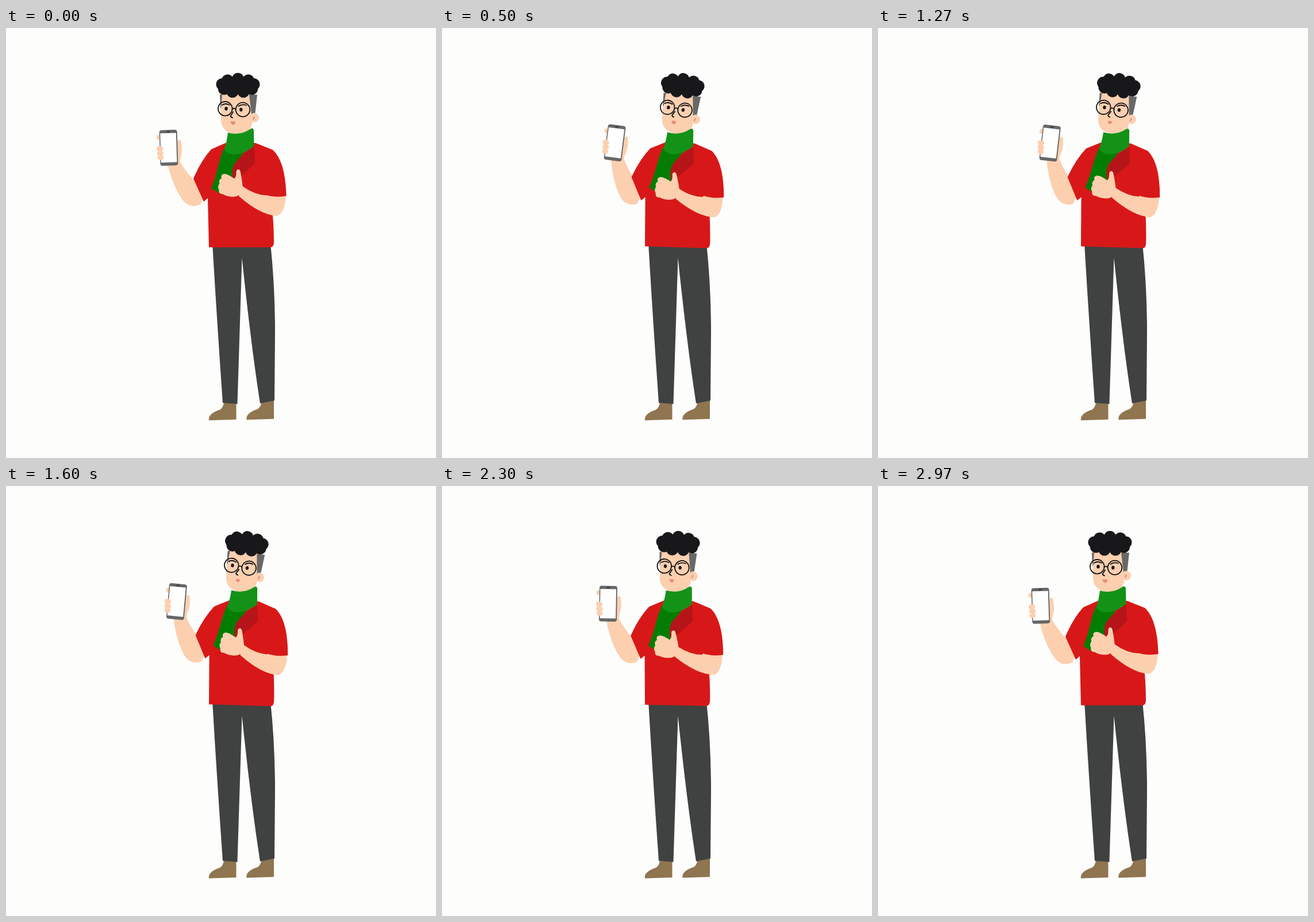
These frames come from a looping animation (748 by 748 pixels, 3 s). An HTML page:

```html
<!DOCTYPE html>
<html lang="en">
<head>
<meta charset="utf-8">
<title>Man with phone</title>
<style>
  html, body { margin: 0; width: 100%; height: 100%; overflow: hidden; background: #fdfdfc; }
  svg { display: block; width: 100vw; height: 100vh; }
  .skin { fill: #fccfaf; }
  .red { fill: #d81818; }
  .dark { fill: #18181b; }
  .side { fill: #676868; }
  .line { fill: none; stroke: #121214; stroke-width: 1.8; stroke-linecap: round; }
  .fingers { stroke: #fccfaf; stroke-width: 8.5; stroke-linecap: round; }
</style>
</head>
<body>
<svg viewBox="0 0 748 748">
  <g fill="#8f7550">
    <path id="shoe" d="M379 648H400.500V681L353 682.500Q351 671 372 664Q379 660 379 648Z"/>
    <use href="#shoe" x="65.500" y="-1"/>
  </g>
  <path fill="#404241" d="M359 374H460Q468 450 468 530L467 648L442 653Q426 550 410.500 400L402.500 654L377 652Q367 510 359 374Z"/>

  <g id="torso">
    <g id="arm" class="skin">
      <path d="M281 236Q290 276 308 300Q320 315 338 307L350 276L326 264Q308 244 301 229Z"/>
      <path d="M290 205L298 198C299 193 304 193 304.500 198Q308 214 304 224L302 240H281L272 226Z"/>
      <path class="fingers" d="M266 190h5"/>
      <g transform="translate(283 208.300) rotate(-1.800)">
        <rect x="-15.500" y="-31" width="31" height="62" rx="4" fill="#666768"/>
        <rect x="-14" y="-25.500" width="27.600" height="51" fill="#fff"/>
        <rect x="-3" y="-29" width="6" height="1.800" rx=".9" fill="#2c2c30"/>
      </g>
      <path class="fingers" d="M266 210h3M267 218h3M268 225.500h2"/>
    </g>

    <g id="head">
      <path class="skin" d="M373 112H428V168Q422 185 402 185Q374 183 374 158Z"/>
      <circle class="skin" cx="432" cy="156" r="8"/>
      <path d="M429 157Q430 152 433 154Q433 160 429 160Z" fill="#dfa591"/>
      <path class="side" d="M372 116H376L374.500 137L373 140ZM423 116H437L433.500 148Q429 147 427 150Z"/>
      <g id="hair" class="dark"><ellipse cx="403.500" cy="100" rx="30" ry="14"/></g>
      <g class="line">
        <circle cx="381.300" cy="140.300" r="12.300"/>
        <circle cx="412" cy="142" r="12.300"/>
        <path d="M393.500 141.500Q396.500 138 399.500 141.500M376 134Q382 130 389 134M404.500 136Q411 131.500 418 134.500M395 146L390.500 153.500Q391.500 155.500 394 156"/>
      </g>
      <ellipse class="dark" cx="383" cy="140.300" rx="2.700" ry="3.200"/>
      <ellipse class="dark" cx="408.800" cy="142" rx="2.700" ry="3.200"/>
      <path id="mouth" fill="#ea8b82" d="M390.500 163.500Q392 161 395 162.500Q398 161.500 399.500 163.500Q399 168.500 395 168.800Q391.500 168 390.500 163.500Z"/>
    </g>

    <path class="red" d="M357 211L382 200H434L464 212Q486 232 487.500 292L464 296V326Q466 352 466 372Q466 381.500 460 381.500H353L351 296L344 302L326 262Q339 231 357 211Z"/>
    <path fill="#037d03" d="M380 208C371 224 369 250 357 279L376 290L395 270Q394 240 414 216Z"/>
    <path fill="#b51519" d="M432 206L433.500 235Q420 248 408 258L395 264Q391 248 397 237Q409 220 432 206Z"/>
    <path fill="#139217" d="M386 182Q408 188 426 175Q430 173 431 178L431.500 205Q414 220 396 220Q384 219 379.500 211Q384 199 386 182Z"/>

    <g id="thumb" class="skin">
      <path d="M411 275Q432 290 452 291L460 280H484L487 292Q485 322 471 327Q442 325 405 292.500Z"/>
      <path d="M412 278Q410 260 407.500 249C406 244.500 401 245.500 400.500 250Q401 259 397 262Q383 252 378 254T375 261Q369 265 371.500 270Q367 276 370.500 281Q369 289 377 289Q388 295 400 293L408 290Z"/>
    </g>
    <path class="red" d="M449 289.500Q468 296 487.500 292Q486 265 481 245L449 250Z"/>
  </g>
</svg>
<script>
const LOOP = 3000;
// Each move is [start ms, end ms, share of the full swing].
const joints = {
  torso: { swing: 1.75, pivot: '410 381', moves: [[0, 520, 1], [1800, 2970, -1]] },
  head: { swing: 4.4, pivot: '405 186', moves: [[0, 540, 1], [1560, 2700, -1]] },
  arm: { swing: 7.5, pivot: '328 298', moves: [[0, 460, 1], [830, 2970, -1]] },
  thumb: { swing: -3.8, pivot: '478 308', moves: [[0, 460, 1], [700, 1760, -.7], [1760, 2330, .75], [2330, 2970, -1.05]] }
};
const byId = id => document.getElementById(id);

function ease(t, start, end) {
  const u = Math.min(1, Math.max(0, (t - start) / (end - start)));
  return u * u * (3 - 2 * u);
}

// Curls: equal bumps around a flat ellipse.
const CURLS = 9;
for (let i = 0; i < CURLS; i++) {
  const a = i / CURLS * 2 * Math.PI;
  const curl = document.createElementNS('http://www.w3.org/2000/svg', 'circle');
  curl.setAttribute('cx', 403.5 + 28 * Math.sin(a));
  curl.setAttribute('cy', 100 - 11.5 * Math.cos(a));
  curl.setAttribute('r', 10.5);
  byId('hair').append(curl);
}

function draw(now) {
  const t = now % LOOP;
  for (const [id, { swing, pivot, moves }] of Object.entries(joints)) {
    const amount = moves.reduce((sum, [start, end, share]) => sum + share * ease(t, start, end), 0);
    byId(id).setAttribute('transform', `rotate(${swing * amount} ${pivot})`);
  }
  const size = .87 + .08 * Math.cos(t / LOOP * 2 * Math.PI);
  byId('mouth').setAttribute('transform', `translate(395 165) scale(${size}) translate(-395 -165)`);
  requestAnimationFrame(draw);
}
draw(performance.now());
</script>
</body>
</html>
```
